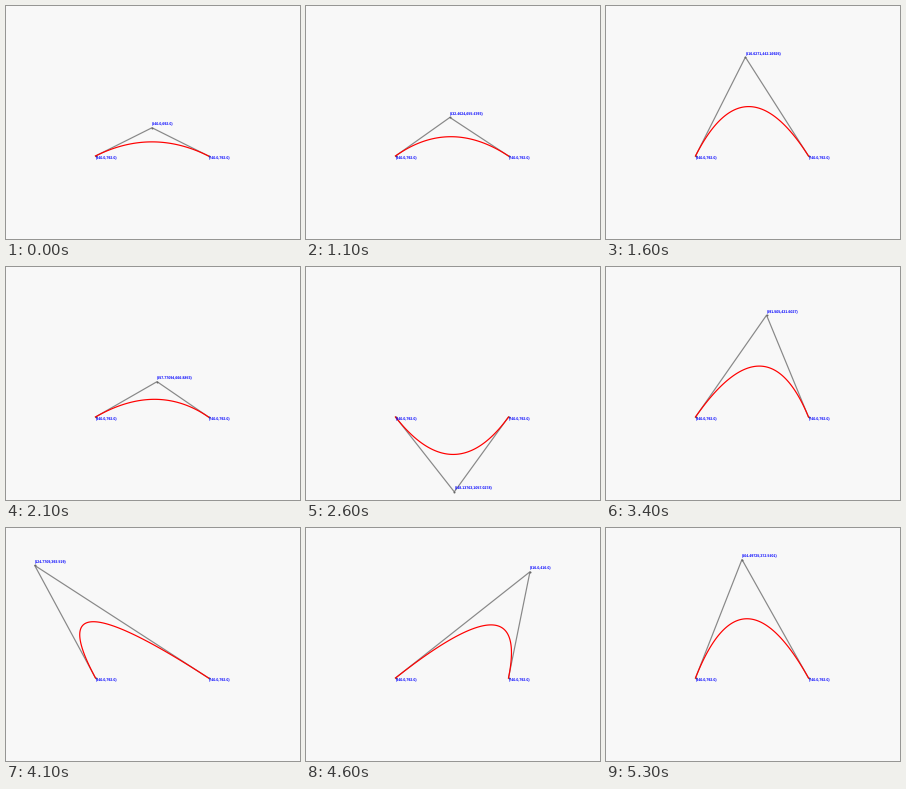
Write a matplotlib script that moves like this. It is 294 by 233 pixels and loops after 5.9 s.

```python
import numpy as np
import matplotlib.pyplot as plt
from matplotlib.animation import FuncAnimation

W, H, DPI = 294, 233, 64
PX = 72 / DPI           # points per pixel
SCALE = 0.2825          # stage pixels per canvas unit
START, END = (340, 792), (740, 792)
TICKS, STEP = 59, 100

# Turning points of the drag: tick, x, y in canvas units
PATH = np.array([
    (10, 540, 692),
    (11, 532.4624, 655.4393),
    (17, 520, 445),
    (21, 557.77094, 666.8853),
    (24, 565, 945),
    (28, 547, 1010),
    (30, 597.0194, 696.3984),
    (34, 591.5050, 431.60268),
    (37, 393, 314),
    (40, 97, 355),
    (41, 124.7709, 393.5190),
    (46, 816, 416),
    (50, 504.49725, 372.5401),
])
KNOTS, POINTS = PATH[:, 0], PATH[:, 1:]
SLOPES = np.gradient(POINTS, KNOTS, axis=0)


def control(tick):
    """Smooth path through the turning points, at rest before and after."""
    tick = np.clip(tick, KNOTS[0], KNOTS[-1])
    i = min(np.searchsorted(KNOTS, tick, side="right"), len(KNOTS) - 1) - 1
    span = KNOTS[i + 1] - KNOTS[i]
    u = (tick - KNOTS[i]) / span
    return ((1 + 2 * u) * (1 - u) ** 2 * POINTS[i]
            + u * (1 - u) ** 2 * span * SLOPES[i]
            + u * u * (3 - 2 * u) * POINTS[i + 1]
            + u * u * (u - 1) * span * SLOPES[i + 1])


def stage(p):
    return np.array([146 + (p[0] - 540) * SCALE,
                     150 + (p[1] - 792) * SCALE])


def label(p):
    """Coordinates as single-precision floats in shortest form."""
    x, y = (str(np.float32(v)) for v in p)
    return f"({x},{y})"


plt.rcParams["text.hinting"] = "none"
fig = plt.figure(figsize=(W / DPI, H / DPI), dpi=DPI, facecolor="#f8f8f8")
ax = fig.add_axes([0, 0, 1, 1])
ax.set_xlim(0, W)
ax.set_ylim(H, 0)
ax.axis("off")

A, B = stage(START), stage(END)
T = np.linspace(0, 1, 100)[:, None]
FONT = dict(family="Liberation Sans", weight="bold", size=3.6 * PX,
            color="#0000ff", ha="left", va="baseline", zorder=5)

arms, = ax.plot([], [], color="#888888", lw=1.2 * PX)
dots, = ax.plot([], [], "o", color="#666666", ms=2 * PX, mew=0)
curve, = ax.plot([], [], color="#ff0000", lw=1.2 * PX)
tag = ax.text(0, 0, "", **FONT)
for corner, point in ((A, START), (B, END)):
    ax.text(corner[0] + 0.2, corner[1] + 3.3, label(point), **FONT)


def draw(tick):
    point = control(tick)
    c = stage(point)
    corners = np.array([A, c, B])
    arms.set_data(*corners.T)
    dots.set_data(*corners.T)
    bezier = (1 - T) ** 2 * A + 2 * T * (1 - T) * c + T ** 2 * B
    curve.set_data(*bezier.T)
    tag.set_position((c[0] + 0.2, c[1] - 2.4))
    tag.set_text(label(point))
    return arms, dots, curve, tag


anim = FuncAnimation(fig, draw, frames=TICKS, interval=STEP,
                     repeat=True, repeat_delay=0, blit=False)
plt.show()
```
